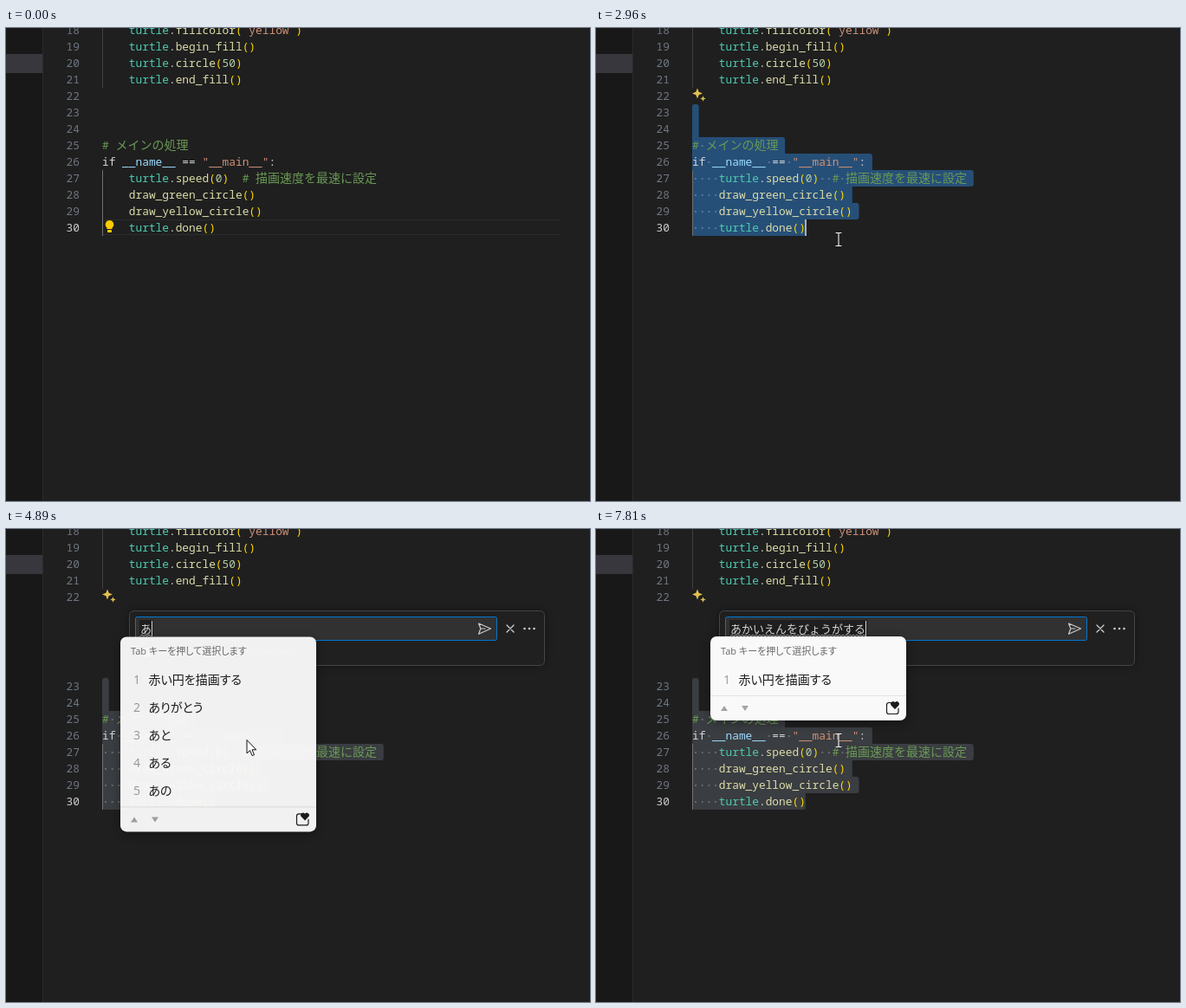
An HTML page that plays this animation: 674x546 px, repeating every 8 s.

```html
<!DOCTYPE html>
<html lang="ja">
<head>
<meta charset="utf-8">
<title>Editor inline chat</title>
<style>
  html, body { margin: 0; width: 100%; height: 100%; overflow: hidden; background: #1f1f1f; }
  svg { display: block; width: 674px; height: 546px; }
  text { white-space: pre; }
  .code { font: 12.833px "Noto Sans Mono", monospace; }
  .jp { font: 14px "Noto Sans CJK JP", sans-serif; }
  .hint { font: 10.4px "Open Sans", sans-serif; fill: #9d9d9d; }
  .ime { font: 13px "Noto Sans CJK JP", sans-serif; fill: #d4d4d4; }
  .cand { font: 14px "Open Sans", "Noto Sans CJK JP", sans-serif; font-feature-settings: "palt"; fill: #1b1b1b; }
  .cand.head { font-size: 11px; fill: #6a6a6a; }
  .cand.num { fill: #999; }
  .popup { filter: drop-shadow(0 3px 6px rgba(0, 0, 0, .35)); }
  .chat { filter: drop-shadow(0 0 4px rgba(0, 0, 0, .36)); }
</style>
</head>
<body>
<svg id="stage" viewBox="0 0 674 546" xmlns="http://www.w3.org/2000/svg">
  <rect width="674" height="546" fill="#1f1f1f"/>
  <rect width="42" height="546" fill="#181818"/>
  <rect x="42" width="1" height="546" fill="#2b2b2b"/>
  <rect y="30" width="42" height="22" fill="#37373d"/>
  <g id="editor"></g>
  <g id="chat"></g>
  <g id="popup"></g>
  <g id="mouse"></g>
</svg>
<script>
const LOOP = 8000, ROW = 19, COL = 7.7, LEFT = 111, FIRST = 18, ANCHOR = 23, LAST = 30, ZONE = 84;
const CHAT_AT = 3510, FOCUS_AT = 3580, POPUP_AT = 4700;

const COLORS = {
  m: '#4ec9b0', w: '#d4d4d4', f: '#dcdcaa', b: '#ffd700',
  n: '#b5cea8', s: '#ce9178', c: '#6a9955', v: '#9cdcfe'
};
const call = (name, arg = '') => [
  ['m', '    turtle'], ['w', '.'], ['f', name], ['b', '('], ...arg, ['b', ')']
];
const ROWS = [
  call('fillcolor', [['s', ' yellow ']]),
  call('begin_fill'),
  call('circle', [['n', '50']]),
  call('end_fill'),
  [], [], [],
  [['c', '# メインの処理']],
  [['w', 'if '], ['v', '__name__'], ['w', ' == '], ['s', '"__main__"'], ['w', ':']],
  [...call('speed', [['n', '0']]), ['c', '  # 描画速度を最速に設定']],
  [['f', '    draw_green_circle'], ['b', '()']],
  [['f', '    draw_yellow_circle'], ['b', '()']],
  call('done')
];

const KEYS = [
  [3580, ''], [4430, 'あ'], [5440, 'あか'], [5640, 'あかい'], [5710, 'あかいえ'],
  [5910, 'あかいえｎ'], [6050, 'あかいえん'], [6440, 'あかいえんｗ'], [6510, 'あかいえんを'],
  [6640, 'あかいえんをｂ'], [6780, 'あかいえんをｂｙ'], [6850, 'あかいえんをびょ'],
  [6990, 'あかいえんをびょう'], [7330, 'あかいえんをびょうｇ'], [7400, 'あかいえんをびょうが'],
  [7530, 'あかいえんをびょうがｓ'], [7600, 'あかいえんをびょうがす'],
  [7740, 'あかいえんをびょうがすｒ'], [7810, 'あかいえんをびょうがする']
];
const TOP = '赤い円を描画する';
const LISTS = [
  [4700, [TOP, 'ありがとう', 'あと', 'ある', 'あの']],
  [5440, [TOP, '赤い液体', '赤い', '明るい', '"aka"']],
  [5710, [TOP, '赤い液体', '"akaie"', 'acai', 'açai']],
  [5980, [TOP, '赤い鉛筆', '"akaien"', '赤い']],
  [6640, [TOP, '"akaiennwo"', '赤い']],
  [6920, [TOP, '"akaiennwobyo"']],
  [7530, [TOP]]
];
const DRAG = [
  [1360, 133, 101], [1500, 136, 104], [1696, 188, 141], [1763, 198, 147],
  [1900, 240, 196], [2100, 280, 244]
];

const $ = id => document.getElementById(id);
const clamp = (v, a, b) => Math.min(b, Math.max(a, v));
const isWide = ch => /[\u3000-\u9fff]/.test(ch);
const esc = s => s.replace(/&/g, '&amp;').replace(/</g, '&lt;');
const rect = (x, y, w, h, fill, more = '') =>
  `<rect x="${x}" y="${y}" width="${w}" height="${h}" fill="${fill}" ${more}/>`;
const label = (cls, x, y, s) => `<text class="${cls}" x="${x}" y="${y}">${esc(s)}</text>`;
const line = (d, color, w = 1) =>
  `<path d="${d}" fill="none" stroke="${color}" stroke-width="${w}" stroke-linecap="round" stroke-linejoin="round"/>`;
const shape = (d, fill) => `<path d="${d}" fill="${fill}"/>`;
const lastIndex = (steps, t) => {
  let i = steps.length - 1;
  while (i >= 0 && steps[i][0] > t) i--;
  return i;
};
const snap = (t, from, step) => from + Math.floor((t - from + 6) / step) * step;

// x of every caret stop in each row, and the plain text
const PLAIN = ROWS.map(r => r.map(p => p[1]).join(''));
const STOPS = PLAIN.map(s => {
  const xs = [LEFT];
  for (const ch of s) xs.push(xs[xs.length - 1] + (isWide(ch) ? 14 : COL));
  return xs;
});
const endX = n => STOPS[n - FIRST][STOPS[n - FIRST].length - 1];
const MARKUP = ROWS.map(r => r.map(([c, s]) =>
  s.split(/([\u3000-\u9fff]+)/).filter(Boolean).map(p =>
    `<tspan fill="${COLORS[c]}"${isWide(p) ? ' class="jp"' : ''}>${esc(p)}</tspan>`).join('')).join(''));

function dragPoint(t) {
  const i = clamp(lastIndex(DRAG, t), 0, DRAG.length - 2);
  const [t0, x0, y0] = DRAG[i], [t1, x1, y1] = DRAG[i + 1];
  const u = clamp((t - t0) / (t1 - t0), 0, 1);
  return [x0 + (x1 - x0) * u, y0 + (y1 - y0) * u];
}

function mouseAt(t) {
  if (t < 260) return null;
  if (t < 1090) {
    const u = clamp((snap(t, 260, 69) - 260) / 759, 0, 1), e = u * u * (3 - 2 * u);
    return [523 - 380 * e, 466 - 362 * e];
  }
  if (t < 1160) return [137, 102];
  if (t < 1360) return [133, 101];
  return dragPoint(snap(t, 1360, 67.27));
}

// the selection trails the pointer by one step
function headAt(t) {
  if (t < 1360) return null;
  const [x, y] = dragPoint(t < 2094 ? snap(t, 1360, 67.27) - 67.27 : t);
  const row = clamp(ANCHOR + Math.floor((y - 88) / ROW), ANCHOR, LAST);
  const near = STOPS[row - FIRST].reduce((a, b) => Math.abs(b - x) < Math.abs(a - x) ? b : a);
  return { row, x: near };
}

function selection(head, topOf, color) {
  const ends = [];
  for (let n = ANCHOR; n <= head.row; n++) ends.push(n < head.row ? endX(n) + COL : head.x);
  return ends.map((x, i) => {
    const y = topOf(ANCHOR + i), b = y + ROW;
    if (x <= LEFT) return '';
    const first = i === 0, last = i === ends.length - 1;
    const r = ok => ok ? 3 : 0;
    const tl = r(first), bl = r(last);
    const tr = r(first || x > ends[i - 1]), br = r(last || x > ends[i + 1]);
    let out = shape(`M${LEFT + tl} ${y}H${x - tr}q${tr} 0 ${tr} ${tr}V${b - br}q0 ${br} ${-br} ${br}` +
      `H${LEFT + bl}q${-bl} 0 ${-bl} ${-bl}V${y + tl}q0 ${-tl} ${tl} ${-tl}Z`, color);
    const k = ANCHOR + i - FIRST;
    [...PLAIN[k]].forEach((ch, c) => {
      const sx = STOPS[k][c];
      if (ch === ' ' && sx < x - 1) out += rect(sx + 3, y + 9, 2, 2, 'rgba(255,255,255,.22)');
    });
    return out;
  }).join('');
}

const bulb = shape('M119.5 222a4.8 4.8 0 0 1 3 8.5V232h-6v-1.5a4.8 4.8 0 0 1 3-8.5Z', '#ffcc00') +
  rect(117, 233, 5, 3, '#ffcc00', 'rx="1"');
const star = (x, y, r) => {
  const k = r * .28;
  return shape(`M${x} ${y - r}L${x + k} ${y - k}L${x + r} ${y}L${x + k} ${y + k}L${x} ${y + r}` +
    `L${x - k} ${y + k}L${x - r} ${y}L${x - k} ${y - k}Z`, '#e2c04f');
};
const sparkle = star(117, 75.5, 6) + star(123.5, 81.5, 3.2);

function editor(t) {
  const head = headAt(t), shift = t >= CHAT_AT ? ZONE : 0;
  const topOf = n => (n - FIRST) * ROW - 7 + (n >= ANCHOR ? shift : 0);
  const active = head ? head.row : LAST;
  const empty = !head || (head.row === ANCHOR && head.x === LEFT);
  let out = '';
  if (empty) {
    const y = topOf(active);
    out += rect(LEFT, y, 528, 1, '#2c2c2c') + rect(LEFT, y + ROW - 2, 528, 1, '#2c2c2c');
  } else {
    out += selection(head, topOf, t >= FOCUS_AT ? '#3a3d41' : '#264f78');
  }
  out += rect(LEFT, 0, 1, topOf(22), '#404040');
  out += rect(LEFT, topOf(27), 1, 4 * ROW, active > 26 ? '#707070' : '#404040');
  ROWS.forEach((_, i) => {
    const n = FIRST + i, y = topOf(n) + 14;
    out += `<text class="code" x="85" y="${y}" text-anchor="end" fill="${n === active ? '#cccccc' : '#6e7681'}">${n}</text>`;
    if (MARKUP[i]) out += `<text class="code" x="${LEFT}" y="${y}">${MARKUP[i]}</text>`;
  });
  if (t < 2230) out += bulb;
  if (t >= 2300) out += sparkle;
  if (head && t < CHAT_AT && !(t >= 2500 && t < 2960))
    out += rect(Math.round(head.x) - 1, topOf(head.row), 2, ROW, '#aeafad');
  return out;
}

function wave(x, w) {
  let d = `M${x} 123.5`;
  for (let i = 2; i <= w; i += 2) d += `L${x + i} ${i % 4 ? 122 : 123.5}`;
  return line(d, '#bdbdbd', .9);
}

function chat(t) {
  if (t < CHAT_AT) return '';
  let out = `<g class="chat">${rect(142.5, 94.5, 479, 63, '#202020', 'rx="5" stroke="#454545"')}</g>`;
  const focused = t >= FOCUS_AT;
  out += rect(149.5, 101.5, 417, 27, '#313131', `rx="2" stroke="${focused ? '#0078d4' : '#3c3c3c'}"`);
  const ink = t >= POPUP_AT ? '#cccccc' : '#6c6c6c';
  out += line('M545.5 109L559.5 115L545.5 121.2L547.8 115ZM547.8 115H553', ink, 1.2);
  out += line('M578 111l8 8m0-8l-8 8', '#cccccc', 1.3);
  for (const x of [598.5, 604, 609.5]) out += `<circle cx="${x}" cy="115" r="1.3" fill="#cccccc"/>`;
  if (!focused) return out;
  out += '<circle cx="162" cy="142.5" r="5.5" fill="#cccccc"/>';
  out += label('hint', 173, 146, 'You can also type / for commands');
  const s = KEYS[lastIndex(KEYS, t)][1], w = s.length * 13;
  if (s) out += rect(154, 105, w + 3, 20, '#1f1f1f') + label('ime', 155, 120, s) + wave(155, w);
  if (!(t >= 4100 && t < 4430)) out += rect(155 + w, 106, 1, 18, '#d4d4d4');
  return out;
}

const heightFor = n => 65 + 32 * n;
function popupHeight(t) {
  const i = lastIndex(LISTS, t);
  if (i < 0) return 0;
  const now = heightFor(LISTS[i][1].length), old = i ? heightFor(LISTS[i - 1][1].length) : now;
  return old + (now - old) * clamp((t - LISTS[i][0]) / 170, 0, 1);
}

function popup(t) {
  const i = lastIndex(LISTS, t);
  if (i < 0) return '';
  const list = LISTS[i][1], h = popupHeight(t), foot = 175 + 32 * list.length;
  const u = clamp((t - POPUP_AT + 60) / 260, 0, 1);
  const moving = h > heightFor(list.length) + .5;
  const body = moving
    ? shape(`M132 ${124 + h}V131q0-7 7-7H351q7 0 7 7V${124 + h}Z`, '#f9f9f9')
    : rect(132, 124, 226, h, '#f9f9f9', 'rx="7"');
  let out = body + label('cand head', 144, 145, 'Tab キーを押して選択します');
  list.forEach((s, k) => {
    const y = 179 + 32 * k;
    out += label('cand num', 147, y, String(k + 1)) + label('cand', 164.5, y, s);
  });
  out += rect(132, foot - 15, 226, 1, '#e3e3e3');
  out += shape(`M144 ${foot + 3}l4-6l4 6Z`, '#a3a3a3') + shape(`M168 ${foot - 3}l4 6l4-6Z`, '#a3a3a3');
  out += line(`M341 ${foot - 6.5}h-3q-2.5 0-2.5 2.5v8q0 2.5 2.5 2.5h8.5q2.5 0 2.5-2.5v-4`, '#1b1b1b', 1.2);
  out += shape(`M345 ${foot + 1}l-4.3-4.3a2.7 2.7 0 0 1 4.3-3.4a2.7 2.7 0 0 1 4.3 3.4Z`, '#1b1b1b');
  return `<g class="popup" opacity="${u}" transform="translate(0 ${12 * (1 - u)})">${out}</g>`;
}

function mouse(t) {
  const p = mouseAt(t);
  if (!p) return '';
  const x = Math.round(p[0]), y = Math.round(p[1]);
  if (124 + popupHeight(t) > 244)
    return `<path d="M278 243.5V259l3.6-3.4l2.5 6l2.4-1l-2.5-5.8h4.8Z" fill="#fff" stroke="#111" stroke-width="1"/>`;
  const glow = t >= 1360 && t < 2230
    ? `<circle cx="${x - 2}" cy="${y - 1}" r="12" fill="#dcd400" opacity=".72"/>` : '';
  return glow + line(`M${x - 3} ${y - 7.5}h2.3l.7 .7l.7-.7h2.3M${x} ${y - 6.5}v13` +
    `M${x - 3} ${y + 7.5}h2.3l.7-.7l.7 .7h2.3`, '#f2f2f2', 1.1);
}

const LAYERS = { editor, chat, popup, mouse }, shown = {};
function render(t) {
  for (const id in LAYERS) {
    const html = LAYERS[id](t);
    if (html !== shown[id]) $(id).innerHTML = shown[id] = html;
  }
}

const start = performance.now();
function tick() {
  render((performance.now() - start) % LOOP);
  requestAnimationFrame(tick);
}
tick();
</script>
</body>
</html>
```
